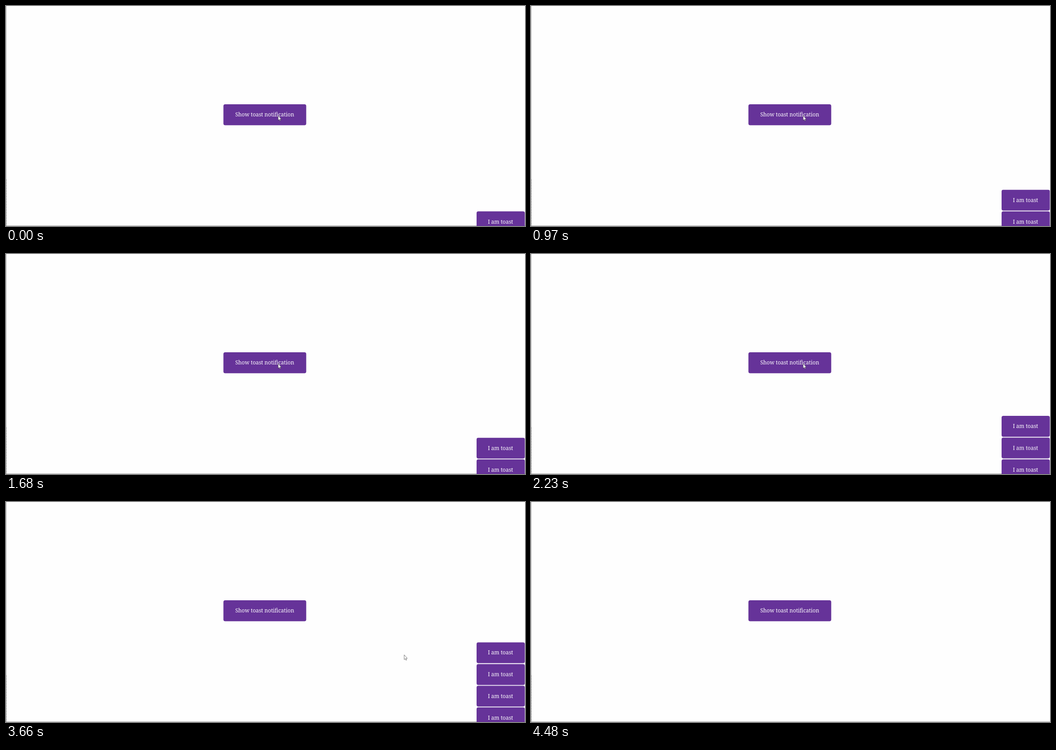
These frames come from a looping animation (1147 px wide and 488 px high, 4.62 s). An HTML page:

```html
<!DOCTYPE html>
<html lang="en">
<head>
<meta charset="utf-8">
<title>Toast notification</title>
<style>
  html, body { margin: 0; width: 100%; height: 100%; overflow: hidden; background: #fefefe; }
  svg { display: block; width: 1147px; height: 488px; }
  text { font: 11.9px "Noto Serif", serif; fill: #fff; text-anchor: middle; }
  .box { fill: #639; }
  .toast, .cursor { animation: 4620ms step-end infinite; }

  .first  { animation-name: first; }
  .second { animation-name: second; }
  .third  { animation-name: third; }
  .fourth { animation-name: fourth; }
  .arrow  { animation-name: arrow; }
  .beam   { animation-name: beam; }

  @keyframes first {
    0% { opacity: 1; }
    96.969% { opacity: 0; }
  }
  /* Older toasts settle by a fraction of a pixel as the stack changes. */
  @keyframes second {
    0% { opacity: 0; transform: translateY(407.4px); }
    3.246% { opacity: 1; transform: translateY(407.4px); }
    12.553% { opacity: 0; transform: translateY(407.4px); }
    20.995% { opacity: 1; transform: translateY(407.4px); }
    30.302% { opacity: 1; transform: translateY(407px); }
    36.363% { opacity: 1; transform: translateY(407.4px); }
    48.268% { opacity: 1; transform: translateY(407px); }
    53.679% { opacity: 1; transform: translateY(407.4px); }
    90.908% { opacity: 0; transform: translateY(407.4px); }
  }
  @keyframes third {
    0% { opacity: 0; transform: translateY(359px); }
    30.302% { opacity: 1; transform: translateY(359px); }
    36.363% { opacity: 0; transform: translateY(359px); }
    48.268% { opacity: 1; transform: translateY(359px); }
    63.852% { opacity: 1; transform: translateY(359.5px); }
    85.064% { opacity: 0; transform: translateY(359.5px); }
  }
  @keyframes fourth {
    0% { opacity: 0; }
    63.852% { opacity: 1; }
    82.034% { opacity: 0; }
  }
  @keyframes arrow {
    0% { opacity: 1; transform: translate(601.5px, 243px); }
    79.22% { opacity: 1; transform: translate(880px, 339px); }
    82.034% { opacity: 1; transform: translate(1093px, 411.5px); }
    85.064% { opacity: 0; transform: translate(1093px, 411.5px); }
  }
  @keyframes beam {
    0% { opacity: 0; transform: translate(1094.5px, 427.5px); }
    85.064% { opacity: 1; transform: translate(1094.5px, 427.5px); }
    88.311% { opacity: 1; transform: translate(1094.5px, 482px); }
    94.155% { opacity: 0; transform: translate(1094.5px, 482px); }
  }
</style>
</head>
<body>
<svg viewBox="0 0 1147 488">
  <defs>
    <g id="toast">
      <rect class="box" x="1040" width="106.5" height="46.4" rx="4"/>
      <text x="1092.8" y="27.3">I am toast</text>
    </g>
  </defs>

  <rect width="1" height="488" fill="#b4b4b4"/>
  <path d="M.5 384V488" stroke="#7c7c7c" stroke-dasharray="5 1"/>
  <rect y="487" width="1147" height="1" fill="#a0a0a0"/>

  <rect class="box" x="480.5" y="218" width="183" height="46.5" rx="4"/>
  <text x="571.8" y="245.4">Show toast notification</text>

  <g class="toast first" style="transform: translateY(455.4px)"><use href="#toast"/></g>
  <g class="toast second"><use href="#toast"/></g>
  <g class="toast third"><use href="#toast"/></g>
  <g class="toast fourth" style="transform: translateY(311.2px)"><use href="#toast"/></g>

  <path class="cursor arrow" d="M0 0V10.6L2.3 8.5 3.9 12 5.4 11.3 3.9 7.9H7Z"
        fill="#fff" stroke="#222" stroke-width=".6"/>
  <path class="cursor beam" d="M-2-5.5H2M0-5.5V5.5M-2 5.5H2" fill="none" stroke="#77756c"/>
</svg>
</body>
</html>
```
